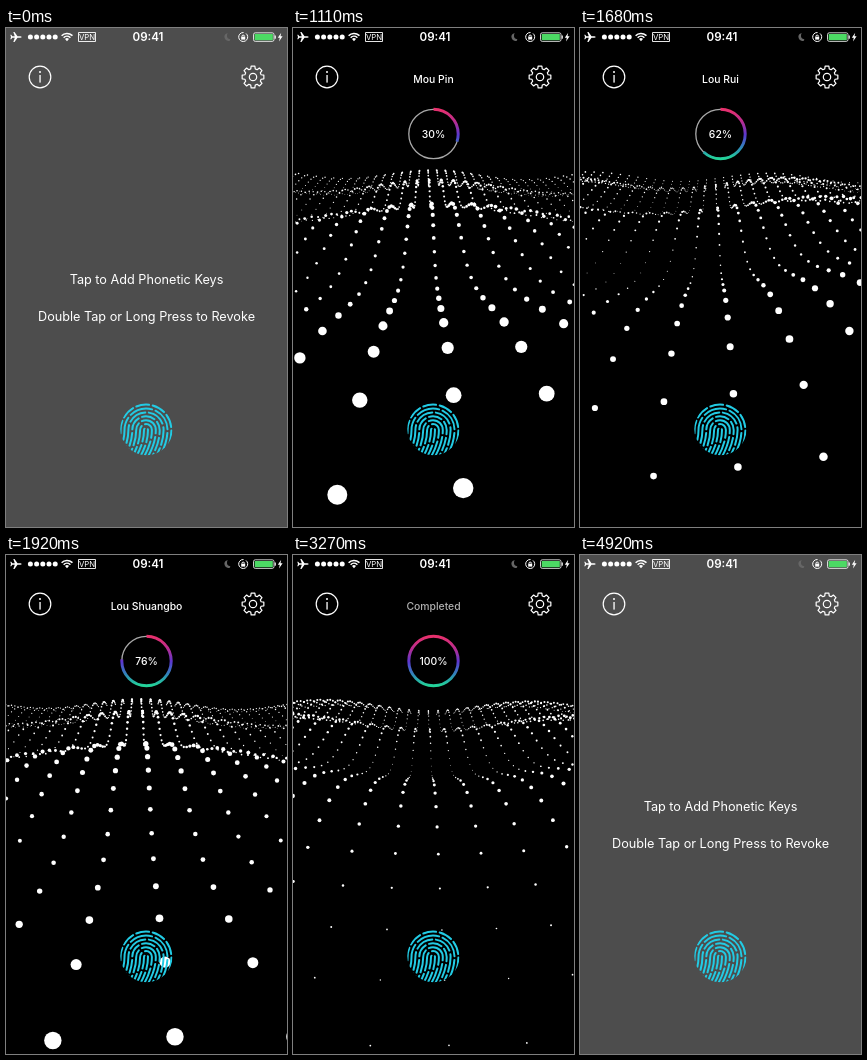
These frames come from a looping animation (281x499 px, 4.95 s). An HTML page with a canvas:

```html
<!DOCTYPE html>
<html lang="en">
<head>
<meta charset="utf-8">
<title>Phonetic keys</title>
<style>
  html, body { margin: 0; height: 100%; overflow: hidden; background: #4d4d4d; }
  canvas { display: block; width: 100vw; height: 100vh; }
</style>
</head>
<body>
<canvas id="stage" width="281" height="499"></canvas>
<script>
const ctx = document.getElementById('stage').getContext('2d');
const LOOP = 4950, TAU = Math.PI * 2, MID = 140.5;
const FONT = 'Inter, "Open Sans", sans-serif';

const surnames = ['Tuo', 'Mou', 'Pei', 'Lou', 'Dou', 'Shuo', 'Ruan'];
const given = ['Weipo', 'Pin', 'Songwei', 'Bolan', 'Shuangbo', 'Rui',
  'Tingmo', 'Leiwan', 'Cenlu', 'Qiangbo', 'Fei'];
const nameAt = i => surnames[i % 7] + ' ' + given[i * 3 % 11];

// Progress over time: [ms, percent]
const progress = [[660, 0], [780, 8], [1410, 50], [1920, 76], [2280, 100]];

function ease(t, from, to) {
  const p = Math.min(1, Math.max(0, (t - from) / (to - from)));
  return p * p * (3 - 2 * p);
}

function percentAt(t) {
  if (t <= progress[0][0]) return 0;
  for (let i = 1; i < progress.length; i++) {
    const [t0, p0] = progress[i - 1], [t1, p1] = progress[i];
    if (t <= t1) return 2 * Math.floor((p0 + (p1 - p0) * (t - t0) / (t1 - t0)) / 2 + 1e-6);
  }
  return 100;
}

function text(str, x, y, size, weight = 400) {
  ctx.font = `${weight} ${size}px ${FONT}`;
  ctx.textAlign = 'center';
  ctx.fillText(str, x, y);
}

function circle(x, y, r) {
  ctx.beginPath();
  ctx.arc(x, y, r, 0, TAU);
}

function poly(points) {
  ctx.beginPath();
  points.forEach(([x, y]) => ctx.lineTo(x, y));
  ctx.closePath();
}

function statusBar() {
  ctx.fillStyle = ctx.strokeStyle = '#fff';
  // plane
  poly([[16, 9], [14.5, 8.2], [11.5, 8.2], [8.5, 4], [7.3, 4], [8.8, 8.2], [6.3, 8.2], [5.2, 6.8],
    [4.3, 6.8], [5, 9], [4.3, 11.2], [5.2, 11.2], [6.3, 9.8], [8.8, 9.8], [7.3, 14], [8.5, 14],
    [11.5, 9.8], [14.5, 9.8]]);
  ctx.fill();
  for (let i = 0; i < 5; i++) { circle(24.4 + i * 6.2, 9, 2.5); ctx.fill(); }
  // wireless
  ctx.lineWidth = 1.5;
  for (const r of [4.6, 7.4]) {
    ctx.beginPath();
    ctx.arc(61, 12.8, r, -Math.PI * .76, -Math.PI * .24);
    ctx.stroke();
  }
  ctx.beginPath();
  ctx.moveTo(61, 13.2);
  ctx.arc(61, 12.8, 2.7, -Math.PI * .76, -Math.PI * .24);
  ctx.fill();
  ctx.lineWidth = .9;
  ctx.strokeRect(72.5, 4.5, 17, 9);
  text('VPN', 81, 12, 7.8);
  text('09:41', 142, 13.2, 11.6, 600);
  // moon
  ctx.fillStyle = '#666';
  ctx.beginPath();
  ctx.arc(222.5, 9, 4, -1.9, 1.2, true);
  ctx.arc(224.8, 7.6, 3.8, 1.7, -2.5);
  ctx.fill();
  // rotation lock
  ctx.fillStyle = '#fff';
  ctx.lineWidth = 1;
  ctx.beginPath();
  ctx.arc(237.2, 9, 4.5, -.9, TAU - 1.5);
  ctx.stroke();
  ctx.fillRect(235.2, 8.6, 4, 3);
  ctx.beginPath();
  ctx.arc(237.2, 8.4, 1.3, Math.PI, 0);
  ctx.stroke();
  // battery
  ctx.lineWidth = .8;
  ctx.beginPath();
  ctx.roundRect(247.5, 4.8, 20.5, 8.6, 1.8);
  ctx.stroke();
  ctx.fillRect(268.6, 7.5, 1.2, 3.2);
  ctx.fillStyle = '#4cd964';
  ctx.fillRect(248.7, 6, 18.1, 6.2);
  ctx.fillStyle = '#fff';
  poly([[275.2, 4.8], [271.8, 9.7], [273.8, 9.7], [273, 13.5], [276.6, 8.3], [274.5, 8.3]]);
  ctx.fill();
}

function toolbar() {
  ctx.strokeStyle = ctx.fillStyle = '#fff';
  ctx.lineWidth = 1.2;
  ctx.lineJoin = 'round';
  circle(34, 49, 10.8);
  ctx.stroke();
  circle(34, 44, 1);
  ctx.fill();
  ctx.fillRect(33.4, 47, 1.3, 7.6);
  // gear
  const teeth = [];
  for (let i = 0; i < 8; i++) {
    for (const [off, r] of [[-.27, 8.4], [-.17, 11], [.17, 11], [.27, 8.4]]) {
      const a = i * TAU / 8 + off;
      teeth.push([247 + r * Math.cos(a), 49 + r * Math.sin(a)]);
    }
  }
  poly(teeth);
  ctx.stroke();
  circle(247, 49, 3.7);
  ctx.stroke();
}

function fingerprint() {
  const x = 140, y = 402;
  ctx.save();
  circle(MID, 401, 26.2);
  ctx.clip();
  ctx.strokeStyle = '#22cbe4';
  ctx.lineWidth = 2;
  ctx.lineCap = 'round';
  for (let i = 0; i < 8; i++) {
    const r = 2 + 3.9 * i;
    ctx.setLineDash([13 + 5 * (i % 3), 3.7]);
    ctx.lineDashOffset = i * 7;
    ctx.beginPath();
    ctx.moveTo(x - r - 8, y + 27);
    ctx.quadraticCurveTo(x - r, y + 13, x - r, y);
    ctx.arc(x, y, r, Math.PI, TAU);
    ctx.quadraticCurveTo(x + r, y + 13, x + r - 8, y + 27);
    ctx.stroke();
  }
  ctx.restore();
}

// A grid of dots on two crossing sine waves, seen by a camera tilted down and turned slightly right
function waves(t) {
  const focal = 335, height = 3.45, cos = .932, sin = .362, yaw = .024;
  const phase = 5.24 + .0268 * (Math.min(t, 2310) - 1920);
  ctx.fillStyle = '#fff';
  for (let row = 41; row >= 2; row--) {
    const dz = row - .13, sy = Math.sin((phase - row) * .5 - 1.276);
    for (let col = -25; col <= 25; col++) {
      const sx = Math.sin((col + phase) * .3);
      const drop = height - .5 * (sx + sy), dx = col + .3;
      const scale = focal / (cos * dz + sin * drop + yaw * dx);
      const px = 132.5 + scale * dx;
      const py = 249.5 + scale * (cos * drop - sin * dz);
      if (px < -12 || px > 293 || py > 511) continue;
      circle(px, py, .25 + scale * (.006 + .019 * (2 + sx + sy)));
      ctx.fill();
    }
  }
}

function ring(percent) {
  const y = 106, r = 24.7;
  ctx.strokeStyle = '#a8a8a8';
  ctx.lineWidth = 1.3;
  circle(MID, y, r);
  ctx.stroke();
  const grad = ctx.createLinearGradient(0, y - r, 0, y + r);
  grad.addColorStop(0, '#e8306c');
  grad.addColorStop(.25, '#b82c90');
  grad.addColorStop(.52, '#5a38d0');
  grad.addColorStop(.78, '#2f88b8');
  grad.addColorStop(1, '#22d498');
  ctx.strokeStyle = grad;
  ctx.lineWidth = 3;
  ctx.beginPath();
  ctx.arc(MID, y, r, -Math.PI / 2, -Math.PI / 2 + TAU * percent / 100);
  ctx.stroke();
  ctx.fillStyle = '#fff';
  text(percent + '%', MID, y + 4, 10.4, 500);
}

function draw(t) {
  const back = ease(t, 4290, 4740);
  const dim = ease(t, 630, 1080) - back;
  const active = ease(t, 600, 1050) - back;
  const grey = Math.round(77 * (1 - dim));
  ctx.globalAlpha = 1;
  ctx.fillStyle = `rgb(${grey},${grey},${grey})`;
  ctx.fillRect(0, 0, 281, 499);

  if (active > 0) {
    const percent = percentAt(t);
    ctx.globalAlpha = active;
    waves(t);
    ring(percent);
    const done = t >= 3120;
    ctx.globalAlpha = active * (done ? ease(t, 3120, 3360) : 1 - ease(t, 2970, 3120));
    text(done ? 'Completed' : nameAt(percent / 2), MID, 55, 10.4, 500);
  }

  ctx.globalAlpha = 1 - dim;
  ctx.fillStyle = '#fff';
  text('Tap to Add Phonetic Keys', MID, 256, 12.68);
  text('Double Tap or Long Press to Revoke', MID, 293, 12.68);

  ctx.globalAlpha = 1;
  statusBar();
  toolbar();
  fingerprint();
}

const start = performance.now();
function tick() {
  draw((performance.now() - start) % LOOP);
  requestAnimationFrame(tick);
}
tick();
</script>
</body>
</html>
```
